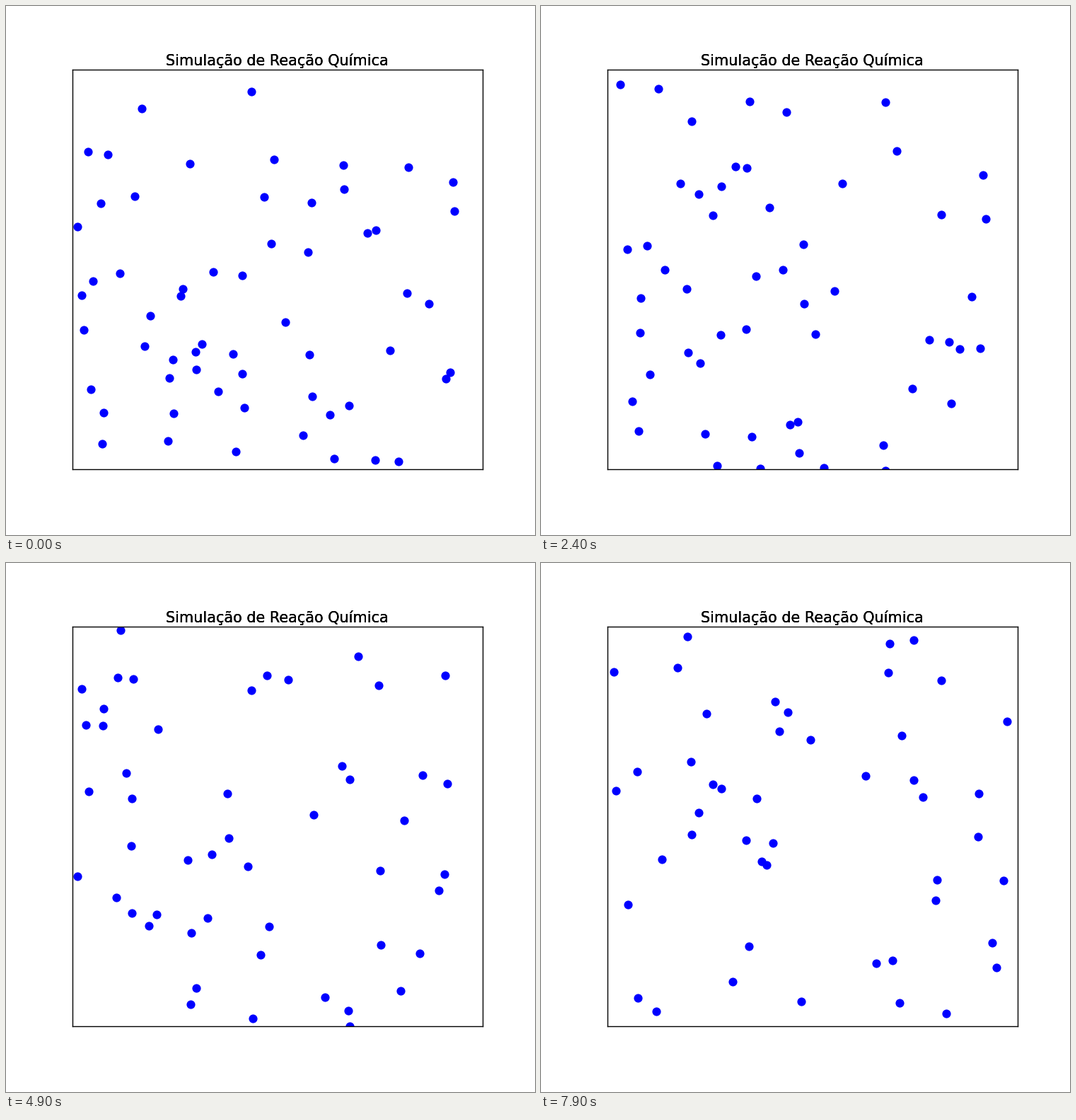
Write a matplotlib script that moves like this. It is 748 px wide and 748 px high and loops after 8 s.

```python
import numpy as np
import matplotlib.pyplot as plt
from matplotlib.animation import FuncAnimation

SIZE, DPI, FRAMES = 748, 136, 80
PX = 72 / DPI  # points per pixel
LEFT, RIGHT, TOP, BOTTOM = 93.5, 673.7, 89.8, 655.4
CONTACT = 10

START = np.array([
    (347, 121), (192, 145), (116, 206), (144, 210), (260, 223), (379, 217),
    (477, 225), (569, 228), (632, 249), (478, 259), (432, 278), (365, 270),
    (182, 269), (134, 279), (634, 290), (101, 312), (511, 321), (523, 317),
    (375, 336), (427, 348), (293, 376), (334, 381), (161, 378), (123, 389),
    (107, 409), (250, 400), (247, 410), (567, 406), (598, 421), (204, 438),
    (395, 447), (110, 458), (196, 481), (277, 478), (268, 489), (236, 500),
    (269, 514), (231, 526), (321, 492), (334, 520), (429, 493), (543, 487),
    (628, 518), (622, 527), (120, 542), (300, 545), (433, 552), (485, 565),
    (458, 578), (337, 568), (237, 576), (138, 575), (136, 619), (229, 615),
    (325, 630), (420, 607), (464, 640), (522, 642), (555, 644)], float)


def population(k):
    """Number of molecules the reaction leaves after k steps."""
    return 46 + 13 * np.exp(-k / 36)


def bounce(pos, vel):
    low, high = (LEFT, TOP), (RIGHT, BOTTOM)
    out = ((pos < low) & (vel < 0)) | ((pos > high) & (vel > 0))
    vel[out] *= -1


def react(pos, vel, k):
    """Touching pairs swap velocities, or fuse while there are too many."""
    alive = np.ones(len(pos), bool)
    for i in range(len(pos)):
        for j in range(i + 1, len(pos)):
            gap = pos[j] - pos[i]
            if not (alive[i] and alive[j]) or np.hypot(*gap) > CONTACT:
                continue
            if gap @ (vel[j] - vel[i]) >= 0:
                continue
            if alive.sum() > population(k):
                alive[j] = False
            else:
                vel[[i, j]] = vel[[j, i]]
    return pos[alive], vel[alive]


def simulate():
    rng = np.random.default_rng(7)
    pos, vel = START.copy(), rng.normal(0, 4, START.shape)
    path = [pos.copy()]
    for k in range(1, FRAMES):
        pos = pos + vel
        bounce(pos, vel)
        pos, vel = react(pos, vel, k)
        path.append(pos.copy())
    return path


path = simulate()

fig = plt.figure(figsize=(SIZE / DPI, SIZE / DPI), dpi=DPI, facecolor="white")
ax = fig.add_axes([LEFT / SIZE, 1 - BOTTOM / SIZE,
                   (RIGHT - LEFT) / SIZE, (BOTTOM - TOP) / SIZE])
ax.set(xlim=(LEFT, RIGHT), ylim=(BOTTOM, TOP), xticks=[], yticks=[])
for spine in ax.spines.values():
    spine.set_linewidth(1.4 * PX)

# Stacked copies give the heavy edges of the lettering.
for _ in range(3):
    fig.text((LEFT + RIGHT) / 2 / SIZE, 1 - 83.5 / SIZE,
             "Simulação de Reação Química", family="DejaVu Sans",
             size=20.8 * PX, ha="center", va="baseline")

dots, = ax.plot([], [], "o", color="#0000ff",
                ms=10.4 * PX, mew=1.75 * PX)


def update(k):
    dots.set_data(*path[k].T)
    return dots,


anim = FuncAnimation(fig, update, frames=FRAMES, interval=100,
                     repeat=True, repeat_delay=0)
plt.show()
```
